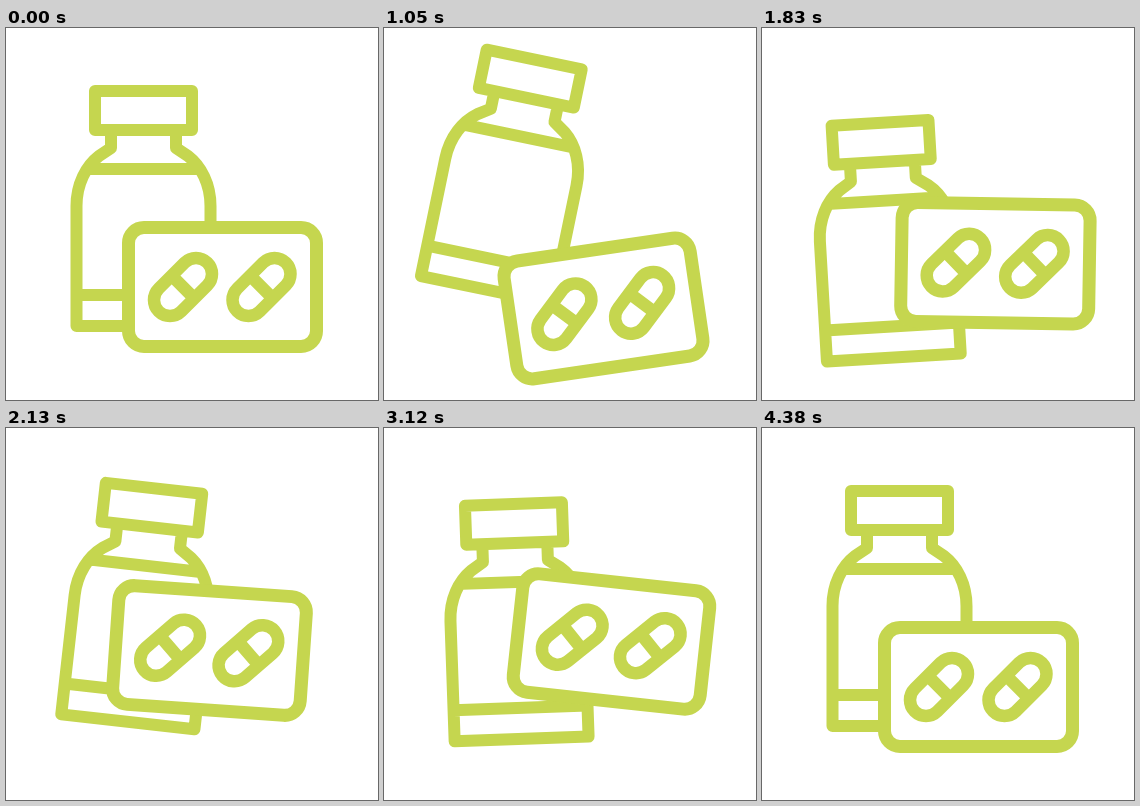
Recreate the animation shown at these times as an HTML page with a canvas. Size 372 px wide and 372 px high, loop 4500 ms.

```html
<!DOCTYPE html>
<html lang="en">
<head>
<meta charset="utf-8">
<title>Medicine</title>
<style>
html, body { margin: 0; width: 100%; height: 100%; overflow: hidden; background: #fff; }
canvas { display: block; width: 372px; height: 372px; }
</style>
</head>
<body>
<canvas id="stage"></canvas>
<script>
const SIZE = 372, LOOP = 4500, STEP = 30;
const GREEN = '#c5d64f';
const canvas = document.getElementById('stage');
const ctx = canvas.getContext('2d');
const scale = window.devicePixelRatio || 1;
canvas.width = canvas.height = SIZE * scale;

// Shared key times; each pose is [dx, dy, degrees]
const times = [150, 420, 690, 1050, 1230, 1530, 1770, 2130, 2310, 2480, 2610, 2850, 3120, 3390, 3660, 3930, 4380];
const bottle = {
  pivot: [137, 180],
  keys: [
    [0, 0, 0], [0, -4, 1.5], [-4, -16, 5], [-11, -34, 11.7], [-27, -26, 8],
    [-24, 27.6, -7.6], [-15, 36, -5], [-2.5, -3.5, 6.4], [-14, -15, 7],
    [-17, -9, 4], [-16, -2, 1.1], [-14, 2, -1], [-4, 13, -2], [-4, 8, 0],
    [-3, -1, 2], [0, -1, 1], [0, 0, 0]
  ]
};
const card = {
  pivot: [216.5, 259],
  keys: [
    [0, 0, 0], [0, 2, -0.5], [0, 7, -2], [3, 21.5, -8.3], [11, 32.5, -9],
    [28, -0.5, -5.2], [22, -20, 0], [-13, -36.5, 4], [0, -20, 0],
    [10, 7, -7], [15.5, -4, -8.1], [19, -26, -1], [11, -45.5, 6.2], [-1, -24, 3],
    [-2, 3, -1], [0, 3, -1], [0, 0, 0]
  ]
};

function slope(keys, i, axis) {
  if (i === 0 || i === keys.length - 1) return 0;
  return (keys[i + 1][axis] - keys[i - 1][axis]) / (times[i + 1] - times[i - 1]);
}

function poseAt(keys, t) {
  if (t <= times[0] || t >= times[times.length - 1]) return [0, 0, 0];
  let i = 0;
  while (t >= times[i + 1]) i++;
  const span = times[i + 1] - times[i];
  const u = (t - times[i]) / span, v = 1 - u;
  return [0, 1, 2].map(axis =>
    keys[i][axis] * (1 + 2 * u) * v * v +
    keys[i + 1][axis] * u * u * (3 - 2 * u) +
    slope(keys, i, axis) * span * u * v * v -
    slope(keys, i + 1, axis) * span * u * u * v);
}

function line(x1, y1, x2, y2) {
  ctx.moveTo(x1, y1);
  ctx.lineTo(x2, y2);
}

function drawBottle() {
  ctx.lineWidth = 12;
  ctx.beginPath();
  ctx.rect(89, 63, 97, 39);
  ctx.moveTo(105, 102);
  ctx.lineTo(105, 120);
  ctx.lineTo(93, 128);
  ctx.bezierCurveTo(80, 138, 70.5, 156, 70.5, 178);
  ctx.lineTo(70.5, 298);
  ctx.lineTo(204.5, 298);
  ctx.lineTo(204.5, 178);
  ctx.bezierCurveTo(204.5, 156, 195, 138, 182, 128);
  ctx.lineTo(170, 120);
  ctx.lineTo(170, 102);
  line(84, 141, 191, 141);
  line(70.5, 267, 204.5, 267);
  ctx.stroke();
}

function drawPill(x, y) {
  ctx.save();
  ctx.translate(x, y);
  ctx.rotate(-Math.PI / 4);
  ctx.beginPath();
  ctx.roundRect(-34.4, -16, 68.8, 32, 16);
  line(0, -16, 0, 16);
  ctx.stroke();
  ctx.restore();
}

function drawCard() {
  ctx.lineWidth = 13;
  ctx.beginPath();
  ctx.roundRect(122.5, 199.5, 188, 119, 15.5);
  ctx.fill();
  ctx.stroke();
  ctx.lineWidth = 12.5;
  drawPill(177, 259);
  drawPill(255.5, 259);
}

function place(part, t, draw) {
  const [dx, dy, deg] = poseAt(part.keys, t);
  const [px, py] = part.pivot;
  ctx.save();
  ctx.translate(px + dx, py + dy);
  ctx.rotate(deg * Math.PI / 180);
  ctx.translate(-px, -py);
  draw();
  ctx.restore();
}

function render(now) {
  const t = Math.floor((now % LOOP) / STEP) * STEP;
  ctx.setTransform(scale, 0, 0, scale, 0, 0);
  ctx.fillStyle = '#fff';
  ctx.fillRect(0, 0, SIZE, SIZE);
  ctx.strokeStyle = GREEN;
  ctx.lineJoin = 'round';
  ctx.lineCap = 'butt';
  place(bottle, t, drawBottle);
  place(card, t, drawCard);
}

const start = performance.now();
function tick() {
  render(performance.now() - start);
  requestAnimationFrame(tick);
}
tick();
</script>
</body>
</html>
```
